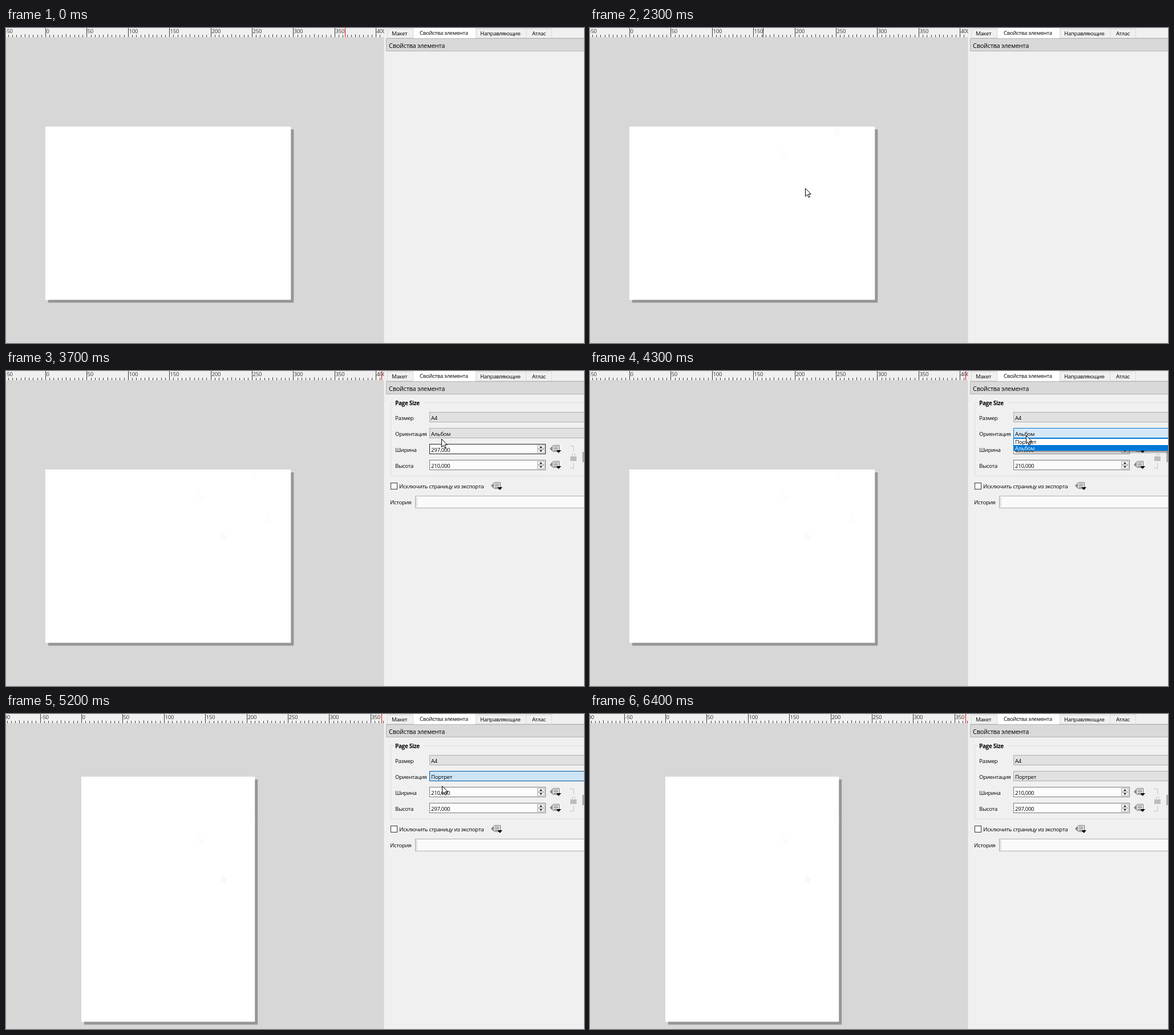
Write an HTML page that moves like this. It is 1013 px wide and 553 px high and loops after 6700 ms.

```html
<!DOCTYPE html>
<html lang="ru">
<head>
<meta charset="utf-8">
<title>Параметры листа</title>
<style>
html, body { margin: 0; width: 100%; height: 100%; overflow: hidden; background: #f0f0f0; }
svg { display: block; }
text { font: 9.6px "Open Sans", "Noto Sans", sans-serif; letter-spacing: -.28px; white-space: pre; }
</style>
</head>
<body>
<svg id="stage" width="1013" height="553" viewBox="0 0 1013 553"></svg>
<script>
const LOOP = 6700, STEP = 100, MM = 1.448;
const MENU_OPEN = 900, MENU_SHUT = 2300, FORM = 2400, POPUP_OPEN = 4300, POPUP_SHUT = 5100, TURN = 5200;

// Pointer legs: start ms, end ms, x, y, power of the slow-down.
const LEGS = [
  [0, 200, 882, 6, 1], [200, 300, 429, 174, 1], [300, 500, 303, 224, 1.9],
  [1400, 2000, 377, 281, .8], [2800, 3500, 762, 129, .7],
  [3500, 4100, 764, 113, 2.5], [4300, 4700, 764, 126, 1], [5700, 6400, 1040, 62, .5]
];

const clamp = v => Math.max(0, Math.min(1, v));

function pointer(t) {
  let px = 1040, py = 6;
  for (const [from, to, x, y, power] of LEGS) {
    const k = 1 - (1 - clamp((t - from) / (to - from))) ** power;
    px += (x - px) * k;
    py += (y - py) * k;
  }
  return [Math.round(px), Math.round(py)];
}

// Button looks: fill and border as RGB.
const NORMAL = [[225, 225, 225], [173, 173, 173]];
const HOVER = [[229, 241, 251], [0, 120, 215]];
const OPEN = [[214, 232, 248], [0, 120, 215]];
const PRESSED = [[204, 228, 247], [0, 84, 153]];

const mix = (a, b, k) => a.map((c, i) => c.map((v, j) => v + (b[i][j] - v) * clamp(k)));
const rgb = c => `rgb(${c.map(Math.round)})`;

const box = (x, y, w, h, fill, stroke) => stroke
  ? `<rect x="${x + .5}" y="${y + .5}" width="${w - 1}" height="${h - 1}" fill="${fill}" stroke="${stroke}"/>`
  : `<rect x="${x}" y="${y}" width="${w}" height="${h}" fill="${fill}"/>`;
const line = (d, stroke) => `<path d="${d}" fill="none" stroke="${stroke}"/>`;
const shape = (d, fill) => `<path d="${d}" fill="${fill}"/>`;
const text = (s, x, y, size = 9.6, fill = '#000', weight = 400) =>
  `<text x="${x}" y="${y}" fill="${fill}" style="font-size:${size}px;font-weight:${weight}">${s}</text>`;
const group = (x, y, body) => `<g transform="translate(${x} ${y})">${body}</g>`;

const ARROW = 'M.5.5v14l3.2-3.1 2.3 5 2.2-1-2.3-4.8h4.5z';
const arrow = ([x, y], stroke, fill) => group(x, y, `<path d="${ARROW}" fill="${fill}" stroke="${stroke}"/>`);

function ruler(zero, t) {
  let out = box(0, 0, 662, 16, '#f0f0f0');
  for (let mm = -100; mm <= 410; mm += 5) {
    const x = Math.round(zero + mm * MM);
    const major = mm % 50 === 0;
    const top = major ? 0 : mm % 25 === 0 ? 11 : 12;
    out += box(x, top, 1, 16 - top, '#3c3c3c');
    if (major) out += text(mm, x + 1.6, 9, 9.6, '#333');
  }
  // The marker follows the pointer, except while the menu holds it.
  const held = t >= 500 && t < 2900;
  const x = t < 300 ? 594 : Math.min(658, pointer(held ? 500 : t)[0]);
  return out + box(x, 0, 1, 16, held ? '#333' : '#f00');
}

function page(t, portrait) {
  const short = 304.2, long = 430.3;
  const [x, y, w, h] = portrait ? [132, 110, short, long] : [69, 173, long, short];
  const trails = [300, 400, 3000].filter(ms => ms < t)
    .map(ms => arrow(pointer(ms), '#f8f8f8', 'none')).join('');
  const rest = t >= 2900 ? arrow(pointer(2800), '#f8f8f8', '#f9f9f9') : '';
  return box(x + 5, y + 5, w, h, '#969696') + box(x, y, w, h, '#fff') +
    `<clipPath id="sheet">${box(x, y, w, h, '#fff')}</clipPath><g clip-path="url(#sheet)">${trails}${rest}</g>`;
}

function tabs() {
  const tab = (x, w) => box(x, 1, w, 17, '#f0f0f0', '#d9d9d9');
  return tab(668, 47) + tab(822, 90) + tab(911, 46) +
    box(667, 17, 346, 1, '#d4d4d4') + box(713, -1, 111, 20, '#fff', '#d9d9d9') +
    text('Макет', 676, 13) + text('Свойства элемента', 725, 12) +
    text('Направляющие', 831, 13) + text('Атлас', 922, 13) +
    box(666, 18, 350, 23, '#d9d9d9', '#b4b4b4') + text('Свойства элемента', 671, 35, 11);
}

const combo = (y, label, [fill, stroke]) =>
  box(742, y, 280, 18, rgb(fill), rgb(stroke)) + text(label, 745, y + 14);

const spin = (y, value, stroke) =>
  box(742, y, 204, 18, '#fcfcfc', stroke) + text(value, 745, y + 14) +
  box(931, y + 2, 13, 7, '#f0f0f0', '#b4b4b4') + box(931, y + 9, 13, 7, '#f0f0f0', '#b4b4b4') +
  shape(`M935 ${y + 7}h5l-2.5-3zM935 ${y + 11}h5l-2.5 3z`, '#111');

// Override button with its drop-down triangle.
const override = (x, y) => group(x, y,
  `<path d="M.7 6.5 6 .5h10.5v11H6z" fill="#ececec" stroke="#777"/>` +
  line('M6.5 3.5h8M6.5 6.5h8M6.5 9.5h5', '#555') + shape('M0 6.5 5 2v9z', '#888') +
  shape('M11 9h9l-4.5 5z', '#000'));

const sizeLink = () =>
  line('M988 131.5h6.5v9M988 170.5h6.5v-9', '#c3c3c3') + box(989, 150, 11, 8, '#bdbdbd') +
  line('M992.5 150v-2a2.500 2.500 0 0 1 5 0v1', '#c6c6c6') + box(1010, 142, 3, 18, '#b0b0b0');

function orientationLook(t) {
  if (t < POPUP_OPEN) return mix(NORMAL, HOVER, (t - 3700) / 400);
  return t < POPUP_SHUT ? OPEN : mix(PRESSED, NORMAL, (t - TURN) / 500);
}

function form(t, portrait) {
  const [width, height] = portrait ? ['210,000', '297,000'] : ['297,000', '210,000'];
  const labels = ['Размер', 'Ориентация', 'Ширина', 'Высота'];
  return line('M680 55.500h-5.500v128.500h340M732 55.500h290', '#dcdcdc') +
    text('Page Size', 682, 60, 9.9, '#000', 700) +
    labels.map((s, i) => text(s, 682, 86 + i * 28)).join('') +
    combo(72, 'A4', NORMAL) +
    combo(100, t >= POPUP_SHUT ? 'Портрет' : 'Альбом', orientationLook(t)) +
    spin(128, width, t >= 3400 && t < 3800 ? '#222' : '#7a7a7a') +
    spin(156, height, '#7a7a7a') +
    override(953, 130) + override(953, 158) + sizeLink() +
    box(674, 196, 12, 12, '#fff', '#333') +
    text('Исключить страницу из экспорта', 689, 206, 9.7) + override(850, 195) +
    text('История', 673, 234) +
    box(717, 219, 300, 22, '#fafafa', '#adadad') + box(718, 221, 3, 18, '#e3e3e3');
}

function popup(t) {
  const picked = pointer(t)[1] > 120 ? 0 : 1;
  let out = '';
  for (let i = 0; i < 5; i++) out += box(744 + i, 140 + i, 269, 1, `rgba(0,0,0,${.4 - i * .08})`);
  out += box(742, 118, 280, 22, '#fff', '#0078d7');
  ['Портрет', 'Альбом'].forEach((name, i) => {
    const on = i === picked, y = 119 + i * 11;
    if (on) out += box(743, y, 270, 10, '#0078d7');
    out += text(name, 745, y + 9, 9.6, on ? '#fff' : '#000');
  });
  return out;
}

function menu(t) {
  const items = [
    ['Отменить действие', 227, 0], ['Повторить действие', 246, 0], ['Параметры Листа', 273, 1],
    ['Настройка направляющих для листа...', 292, 1], ['Удалить Лист', 311, 0]
  ];
  const y = pointer(t)[1];
  let out = '';
  for (let i = 3; i > 0; i--) out += box(307, 228, 234 + i, 105 + i, `rgba(0,0,0,${.48 - i * .1})`);
  out += box(303, 224, 239, 109, '#f0f0f0', '#bcbcbc');
  for (const [name, top, live] of items) {
    if (y >= top && y < top + 19) out += box(306, top, 233, 19, live ? '#91c9f7' : '#e4e4e4');
    out += text(name, 333.5, top + 14, 10.3, live ? '#000' : '#6d6d6d');
  }
  return out + box(331, 268, 207, 1, '#d0d0d0');
}

function scene(t) {
  const portrait = t >= TURN;
  const during = (from, to, draw) => t >= from && t < to ? draw(t, portrait) : '';
  return box(0, 0, 1013, 553, '#f0f0f0') + box(0, 16, 662.5, 537, '#d7d7d7') +
    `<svg width="663" height="553">${ruler(portrait ? 132 : 69, t)}${page(t, portrait)}</svg>` +
    tabs() +
    during(FORM, LOOP, form) +
    during(POPUP_OPEN, POPUP_SHUT, popup) +
    during(MENU_OPEN, MENU_SHUT, menu) +
    during(200, LOOP, () => arrow(pointer(t), '#000', '#fff'));
}

const stage = document.getElementById('stage');
const start = performance.now();
let shown = -1;

function draw() {
  const t = Math.floor(((performance.now() - start) % LOOP) / STEP) * STEP;
  if (t !== shown) {
    stage.innerHTML = scene(t);
    shown = t;
  }
  requestAnimationFrame(draw);
}
draw();
</script>
</body>
</html>
```
